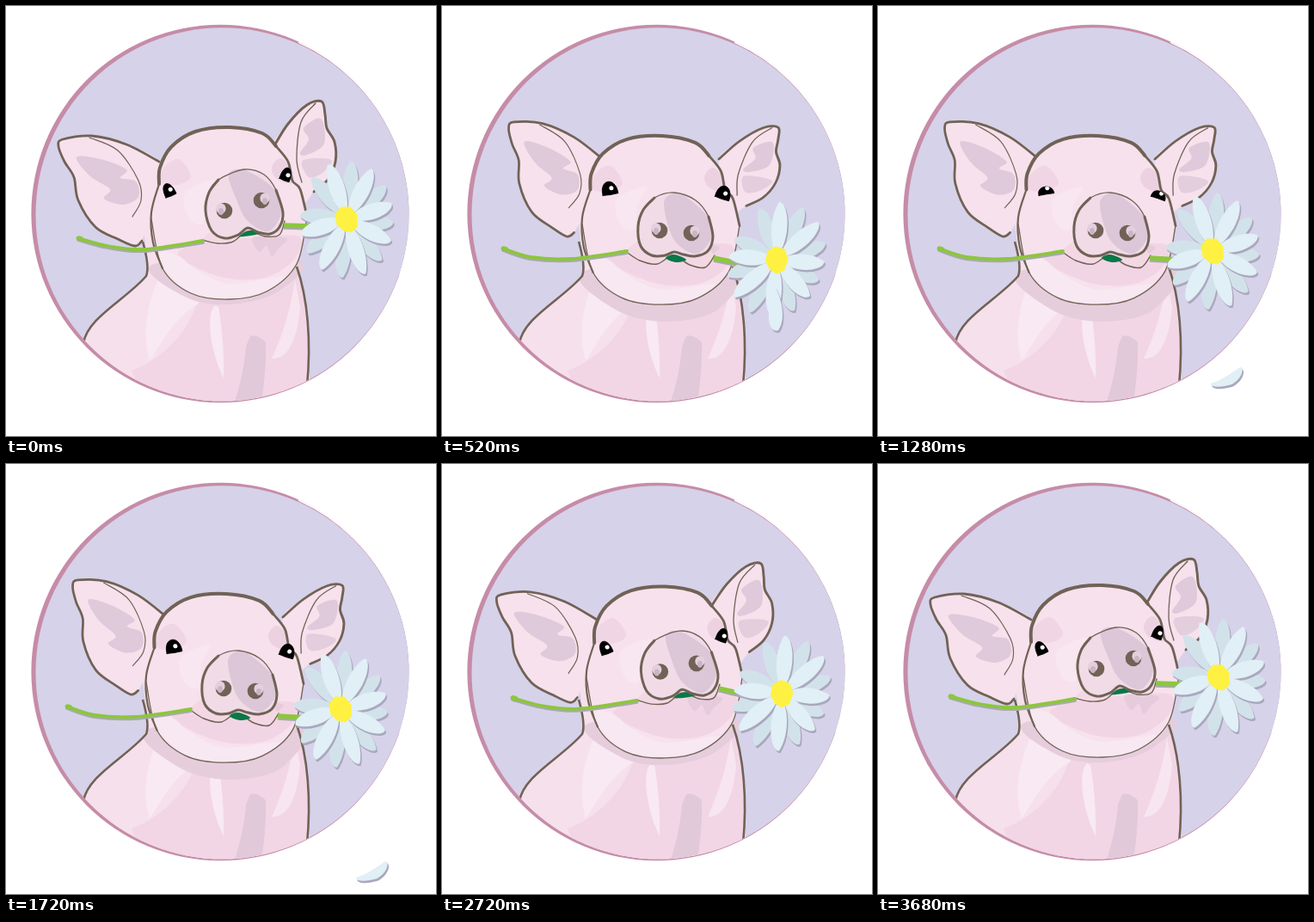
An HTML page for the animation above (3840 ms loop, 500x500 px).

```html
<!DOCTYPE html>
<html lang="en">
<head>
<meta charset="utf-8">
<title>Pig with a daisy</title>
<style>
html,body{margin:0;width:100%;height:100%;overflow:hidden;background:#fff}
svg{display:block;width:100vw;height:100vh}
</style>
</head>
<body>
<svg id="stage" viewBox="0 0 500 500">
  <defs><clipPath id="disc"><circle cx="251.5" cy="242.3" r="217"/></clipPath></defs>
  <circle cx="249.2" cy="241.5" r="219.8" fill="#c68ca7"/>
  <path d="M340 42A219.6 219.6 0 0 1 458 312" fill="none" stroke="#fff" stroke-width="1.6"/>
  <circle cx="251.5" cy="242.3" r="217" fill="#d6d2e9"/>
  <g clip-path="url(#disc)">
    <path fill="#f6e0eb" d="M158 245L165 300Q166 314 158 320C130 343 95 365 90 392L150 470H352C354 420 354 350 337 300V240Z"/>
    <path fill="#f2d6e5" d="M224 330C222 370 185 410 146 424L165 470H352C354 420 354 350 337 300Z"/>
    <path fill="#f8e9f2" d="M178 316C162 350 159 385 167 412C174 406 190 365 224 346C222 330 200 325 178 316Z"/>
    <path fill="#f8e9f2" d="M243 348C232 358 237 400 253 433C254 408 251 370 247 350Z"/>
    <path fill="#f7e5ef" d="M336 318C330 360 318 390 309 410C326 412 339 390 342 350Z"/>
    <path fill="#e1c9da" d="M284 384Q292 381 302 391C303 415 300 440 296 470H262C272 445 277 420 279 396Z"/>
    <path id="shadow" fill="#e6cddc"/>
    <path fill="none" stroke="#706256" stroke-width="2.6" d="M159 274C163 288 167 304 163 314C140 341 95 362 90 392M338 303C351 340 355 390 350 442"/>
  </g>
  <g id="pig" fill="none" stroke-linecap="round" stroke-linejoin="round"></g>
  <g id="daisy" fill="none"></g>
</svg>
<script>
const LOOP = 3840, STEP = 40, BROWN = '#706256', NS = 'http://www.w3.org/2000/svg';
const pig = document.getElementById('pig'), daisy = document.getElementById('daisy');
const nums = s => s.split(/[\s,]+/).map(Number);
const mix = (a, b, p) => a + (b - a) * p;
const mixAll = (a, b, p) => a.map((n, i) => mix(n, b[i], p));
const ramp = (t, from, to) => Math.max(0, Math.min(1, (t - from) / (to - from)));
const bump = (t, mid, half) => Math.max(0, 1 - Math.abs(t - mid) / half);

function set(el, attrs) {
  for (const k in attrs) el.setAttribute(k, attrs[k]);
  return el;
}
const add = (parent, tag, attrs) => parent.appendChild(set(document.createElementNS(NS, tag), attrs));

// Smooth curve through a flat list of coordinates
function spline(v, closed) {
  const n = v.length / 2;
  const at = i => {
    i = closed ? (i + n) % n : Math.max(0, Math.min(n - 1, i));
    return [v[2 * i], v[2 * i + 1]];
  };
  let d = 'M' + at(0);
  for (let i = 0; i < (closed ? n : n - 1); i++) {
    const [a, b, c, e] = [at(i - 1), at(i), at(i + 1), at(i + 2)];
    d += `C${b.map((x, k) => x + (c[k] - a[k]) / 6)} ${c.map((x, k) => x - (e[k] - b[k]) / 6)} ${c}`;
  }
  return d + (closed ? 'Z' : '');
}
const blob = (g, pts, fill) => add(g, 'path', { d: spline(nums(pts), true), fill });
const line = (g, pts, w) => add(g, 'path', { d: spline(nums(pts)), stroke: BROWN, 'stroke-width': w });

// Things that follow the nod: each takes p, 0 = head up, 1 = head down
const nod = [];

// Group carried along by three anchor points
function part(up, low) {
  const g = add(pig, 'g', {}), s = nums(up), to = nums(low);
  const [x, y, ux, uy, vx, vy] = [s[0], s[1], s[2] - s[0], s[3] - s[1], s[4] - s[0], s[5] - s[1]];
  const det = ux * vy - uy * vx;
  nod.push(p => {
    const t = mixAll(s, to, p);
    const row = k => {
      const u = t[2 + k] - t[k], v = t[4 + k] - t[k];
      return [(u * vy - v * uy) / det, (v * ux - u * vx) / det];
    };
    const [a, c] = row(0), [b, d] = row(1);
    set(g, { transform: `matrix(${[a, b, c, d, t[0] - a * x - c * y, t[1] - b * x - d * y]})` });
  });
  return g;
}

// Curve that changes its shape between the two poses
function morph(el, up, low, closed) {
  const a = nums(up), b = nums(low);
  nod.push(p => set(el, { d: spline(mixAll(a, b, p), closed) }));
}
morph(document.getElementById('shadow'), '172,300 208,338 262,347 318,331 338,295', '166,308 200,352 260,367 322,352 341,300', true);

// Ears
const left = part('61,160 178,181 150,279', '78,139 187,178 145,268');
const rimL = '178,181 140,161 100,151 66,155 61,163 68,181 79,199 84,226 104,257 130,271 150,279 158,273';
blob(left, rimL + ' 166,250 178,215', '#f7e1ec');
blob(left, '82,176 110,178 140,190 133,200 151,204 154,222 136,231 114,224 121,213 98,198', '#dfcadb');
line(left, '97,153 130,168 154,203 157,226 147,245', 1.2);
line(left, rimL, 2.8);

const right = part('311,164 366,111 383,180', '322,178 390,141 388,205');
const rimR = '311,164 328,137 350,115 367,111 371,126 373,142 382,158 383,181 374,202 358,216';
blob(right, rimR + ' 344,230 330,200', '#f7e1ec');
blob(right, '346,142 366,131 370,160 350,173 342,171 352,155', '#dfcadb');
blob(right, '344,181 362,177 379,180 368,194 352,199', '#e3cedd');
line(right, '360,113 343,135 338,178 344,205', 1.3);
line(right, rimR, 2.9);

// Head
const head = part('169,248 350,245 260,141', '163,253.5 346,255.5 256,151');
const brow = '178,207 179,188 192,164 220,146 260,141 298,148 314,163', side = '314,163 328,181 333,203 342,213 350,245';
const jaw = '350,245 338,300 303,332 260,341 215,334 182,305 169,248', cheek = '182,305 171,275 169,240 178,207';
blob(head, [brow, side, jaw].join(' '), '#f7e1ec');
blob(head, '200,290 232,274 280,270 340,268 335,295 300,316 250,315', '#f2d5e4');
blob(head, '176,285 200,290 222,307 260,323 322,315 300,332 260,340 215,333 183,305', '#f8e8f1');
blob(head, '182,190 200,178 215,197 203,207 182,207', '#f0d6e4');
blob(head, '309,188 319,177 332,190 333,206 315,201', '#ecd2e1');
blob(head, '208,218 242,202 232,225 230,252 214,248', '#f8e7f0');
line(head, brow, 4);
line(head, side, 2.8);
line(head, jaw, 1.3);
line(head, cheek, 2.2);

// Mouth and snout
const lip = ['228,272 246,276 264,274 281,262 302,268 318,266 324,250', '213,285 230,296 250,300 269,290 288,301 306,304 317,290'];
blob(head, '288,269 294,286 303,279 309,291 317,282 326,270', '#e6cbdc');
morph(add(pig, 'path', { fill: '#f3d8e4' }), lip[0] + ' 280,235', lip[1] + ' 270,255', true);
morph(add(pig, 'path', { stroke: BROWN, 'stroke-width': 1.4 }), ...lip);
morph(add(pig, 'path', { fill: '#087848' }), '271,268 284,261 297,264 284,267', '260,293 270,289 284,295 272,298', true);
const crown = ['232,238 235,218 247,202 277,190 300,196 314,214 322,240', '228,256 234,237 247,223 270,217 295,226 310,245 315,268'];
const base = ['314,214 322,240 318,257 307,265 293,263 281,258 270,266 254,270 239,261 232,238 236,217 247,202', '310,245 315,268 309,285 294,291 281,289 270,286 259,290 244,290 231,279 228,256 234,237 247,223'];
const full = k => crown[k] + base[k].slice(15, -16);
morph(add(pig, 'path', { fill: '#f0dbe7' }), full(0), full(1), true);
morph(add(pig, 'path', { fill: '#dcc7d8' }), '259,196 278,191 312,213 320,240 305,262 281,250 268,225', '268,218 281,220 310,246 314,268 296,288 270,272 258,231', true);
morph(add(pig, 'path', { stroke: BROWN, 'stroke-width': 1.3 }), ...crown);
morph(add(pig, 'path', { stroke: BROWN, 'stroke-width': 3 }), ...base);

function nostril(up, low, side) {
  const g = add(pig, 'g', {});
  add(g, 'circle', { r: 9.3, fill: BROWN });
  add(g, 'ellipse', { cx: side * 4, cy: -2.5, rx: 5.6, ry: 6, fill: '#e3cfdd' });
  add(g, 'ellipse', { cx: side * 4, cy: 1, rx: 3, ry: 4, fill: '#cbb4c4' });
  nod.push(p => set(g, { transform: `translate(${mixAll(up, low, p)})` }));
}
nostril([254, 238], [253, 261], -1);
nostril([297, 226], [290, 264], 1);

// Eyes: x, y, tilt and width in each pose
function eye(id, up, low) {
  const g = add(pig, 'g', {});
  const mask = add(add(g, 'clipPath', { id }), 'path', {});
  const ball = add(g, 'path', { fill: '#000', stroke: '#000', 'stroke-width': .8 });
  add(g, 'circle', { cx: 2, cy: -7, r: 2.5, fill: '#fff', 'clip-path': `url(#${id})` });
  return (p, lid) => {
    const [x, y, tilt, w] = mixAll(up, low, p), h = 20 * (1 - .86 * lid);
    const d = `M${-w} 0C${-w - 2} ${-h} ${w} ${-h} ${w} 0Q0 ${1 - 3 * lid} ${-w} 0Z`;
    set(mask, { d });
    set(ball, { d });
    set(g, { transform: `translate(${x} ${y}) rotate(${tilt})` });
  };
}
const eyes = [eye('eyeL', [192, 220.5, -22, 6.5], [196, 219, -9, 9]), eye('eyeR', [323.5, 202.5, 22, 6], [325.5, 224, 19, 8.5])];

// Stem
const GREY = '#aaa8b0', GREEN = '#8cc63e';
const stems = [[GREY, 2], [GREEN, 0]].map(([stroke, dy]) => {
  const g = add(daisy, 'g', { stroke, transform: `translate(0 ${dy})` });
  morph(add(g, 'path', { 'stroke-width': 3.8, 'stroke-linecap': 'round' }), '84,270 118,279 160,283 229,273', '71,282 103,292 150,294 215,285');
  return add(g, 'path', { 'stroke-width': 5.5 });
});
const knob = add(daisy, 'ellipse', { rx: 4.5, ry: 3, fill: GREEN });
nod.push(p => set(knob, { transform: `translate(${mix(86, 73, p)} ${mix(270.5, 282.5, p)}) rotate(20)` }));

// Daisy: two rings of petals, longer towards top and bottom
const LIGHT = '#e1eff6', DARK = '#d2e2ea', SHADE = '#aaa8bd';
const flower = add(daisy, 'g', {}), petals = [];
function ring(first, count, color) {
  for (const fill of [SHADE, color])
    for (let i = 0; i < count; i++) {
      const angle = first + i * 45, n = 54 + 14 * Math.sin(angle * Math.PI / 180) ** 2;
      const d = `M5 0C${n * .25} -10 ${n * .72} -13 ${n} -3C${n + 2} 3 ${n * .8} 10 ${n * .5} 9C${n * .3} 8 ${n * .15} 5 5 0Z`;
      petals.push({ el: add(flower, 'path', { d, fill }), angle, off: fill === SHADE ? 2.5 : 0 });
    }
}
ring(-129, 8, DARK);
ring(-107, 7, LIGHT);
const heart = add(flower, 'path', { d: 'M-13 -7L-5 -15L6 -14L13 -4L12 10L4 16L-5 13L-12 5Z', fill: '#fff141' });

const fallen = [SHADE, LIGHT].map(fill => add(daisy, 'path', { fill }));

function dropPetal(t) {
  const curl = ramp(t, 520, 1280), on = t >= 360 && t < 2240;
  const x = 387 + 18 * curl + 20 * ramp(t, 1280, 1680), y = 352 + (t - 520) * .0955 + 6 * curl;
  const w = mix(8, 5, curl), b = 7 * curl, r = mix(25, 20, curl);
  const d = `M${-r} 0C${-r * .4} ${b - w} ${r * .5} ${b - w * 1.7} ${r} ${-w * .6}C${r + 3} ${w * .7} ${r * .5} ${b + w} 0 ${b + w * .8}C${-r * .4} ${b + w * .6} ${-r - 2} ${w} ${-r} 0Z`;
  fallen.forEach((el, i) => set(el, {
    d, display: on ? 'inline' : 'none',
    transform: `translate(${x + 1.5 * (1 - i)} ${y + 2.5 * (1 - i)}) rotate(${92 - 117 * curl})`
  }));
}

function draw(t) {
  const p = ramp(t, 0, 520) - ramp(t, 2280, 2800);
  const sway = ramp(t, 0, 520) - ramp(t, 520, 1000);
  const turn = 22 * (sway + ramp(t, 2280, 2700) - ramp(t, 3100, 3640));
  const drop = 10 * sway + 13 * (ramp(t, 2280, 2720) - ramp(t, 2720, 3080));
  const lid = Math.max(bump(t, 1420, 260), bump(t, 2380, 280), bump(t, 3080, 220));
  nod.forEach(f => f(p));
  eyes.forEach(f => f(p, lid));

  const x = mix(396, 389, p), y = mix(248, 285, p) + drop;
  const d = `M${mix(323, 316, p)} ${mix(255, 293, p)}L${mix(356, 350, p)} ${mix(256, 295, p) + drop * .5}`;
  stems.forEach(el => set(el, { d }));
  for (const q of petals)
    set(q.el, { transform: `translate(${x + q.off * .6} ${y + q.off}) rotate(${q.angle + turn})` });
  set(heart, { transform: `translate(${x} ${y}) rotate(${turn - 6})` });
  dropPetal(t);
}

const start = performance.now();
function tick() {
  const t = (performance.now() - start) % LOOP;
  draw(Math.floor(t / STEP) * STEP);
  requestAnimationFrame(tick);
}
draw(0);
requestAnimationFrame(tick);
</script>
</body>
</html>
```
